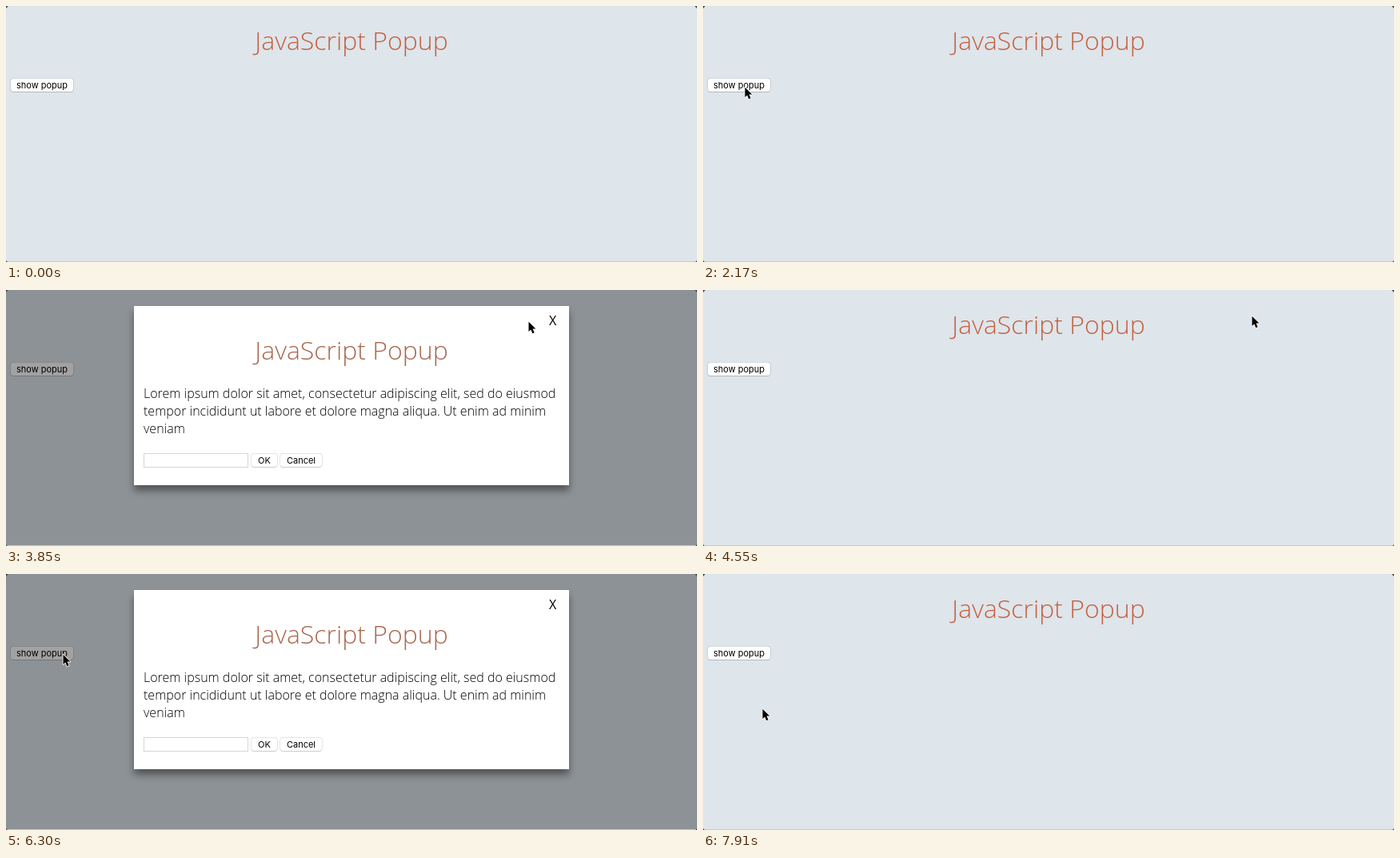
Write an HTML page that moves like this. It is 864 px wide and 320 px high and loops after 8 s.

```html
<!DOCTYPE html>
<html lang="en">
<head>
<meta charset="utf-8">
<title>JavaScript Popup</title>
<style>
  html, body { margin: 0; width: 100%; height: 100%; overflow: hidden; background: #c3c9cd; }
  svg { display: block; width: 864px; height: 320px; }

  text { font: 300 16px "Open Sans", sans-serif; }
  .title { font-size: 32px; text-anchor: middle; fill: #c4603e; }
  .popup .title { fill: #a9674f; }
  .close { font-weight: 400; text-anchor: middle; }
  .label { font: 400 11px Inter, "Liberation Sans", sans-serif; text-anchor: middle; }
  .edge { fill: #000; opacity: .2; }
  .face { fill: #fff; }

  .popup, .ring, .cursor { animation: 8s step-end infinite; }
  .popup { animation-name: popup; }
  .ring { animation-name: click; }
  .cursor { animation-name: move; }

  @keyframes popup {
    0%, 56%, 98%, 100% { visibility: hidden; }
    30.625%, 78.75% { visibility: visible; }
  }

  @keyframes click {
    0%, 12.25%, 56.875%, 98.875%, 100% { visibility: hidden; }
    11.375%, 55.125%, 97.125% { visibility: visible; }
  }

  /* each step lasts 70 ms */
  @keyframes move {
    0% { transform: translate(393px, 340px); }
    .875% { transform: translate(393px, 303px); animation-timing-function: steps(3); }
    3.5% { transform: translate(230px, 150px); animation-timing-function: steps(2); }
    5.25% { transform: translate(110px, 60px); }
    6.125% { transform: translate(75px, 46px); }
    7% { transform: translate(61px, 72px); }
    7.875% { transform: translate(58px, 98px); }
    8.75% { transform: translate(59px, 106px); }
    23.625% { transform: translate(59px, 106px); animation-timing-function: steps(4); }
    27.125% { transform: translate(52px, 101px); }
    30.625% { transform: translate(52px, 101px); animation-timing-function: steps(12); }
    41.125% { transform: translate(57px, 157px); animation-timing-function: steps(4); }
    44.625% { transform: translate(320px, 120px); animation-timing-function: steps(4); }
    48.125% { transform: translate(653px, 39px); animation-timing-function: steps(3); }
    50.75% { transform: translate(686px, 32px); }
    59.5% { transform: translate(686px, 32px); animation-timing-function: steps(6); }
    64.75% { transform: translate(270px, 70px); animation-timing-function: steps(6); }
    70% { transform: translate(72px, 102px); }
    70.875% { transform: translate(71px, 100px); }
    78.75% { transform: translate(71px, 100px); animation-timing-function: steps(11); }
    88.375% { transform: translate(531px, 78px); }
    89.25% { transform: translate(430px, 112px); }
    90.125% { transform: translate(250px, 148px); }
    91% { transform: translate(110px, 167px); }
    91.875% { transform: translate(57px, 170px); }
    92.75%, 100% { transform: translate(74px, 168px); }
  }
</style>
</head>
<body>
<svg viewBox="0 0 864 320">
  <defs>
    <filter id="shadow" x="-10%" y="-10%" width="120%" height="130%">
      <feDropShadow dx="0" dy="7" stdDeviation="5" flood-color="#000" flood-opacity=".42"/>
    </filter>
  </defs>

  <rect width="864" height="319" fill="#dee5eb"/>
  <text class="title" x="432" y="55">JavaScript Popup</text>
  <rect class="edge" x="5.5" y="90" width="79" height="18" rx="4"/>
  <rect class="face" x="6" y="90.5" width="78" height="16.5" rx="3.5"/>
  <text class="label" x="45" y="103">show popup</text>

  <g class="popup">
    <rect width="864" height="319" opacity=".365"/>
    <rect x="160" y="20" width="544" height="224" fill="#fff" filter="url(#shadow)"/>
    <text class="close" x="683.7" y="44">X</text>
    <text class="title" x="432" y="87">JavaScript Popup</text>
    <text y="135">
      <tspan x="172">Lorem ipsum dolor sit amet, consectetur adipiscing elit, sed do eiusmod</tspan>
      <tspan x="172" dy="22">tempor incididunt ut labore et dolore magna aliqua. Ut enim ad minim</tspan>
      <tspan x="172" dy="22">veniam</tspan>
    </text>
    <rect x="172.5" y="204.5" width="130" height="17" fill="#fff" stroke="#d6d6d6"/>
    <rect class="edge" x="306.5" y="204" width="33" height="18" rx="4"/>
    <rect class="face" x="307" y="204.5" width="32" height="16.5" rx="3.5"/>
    <text class="label" x="323" y="217">OK</text>
    <rect class="edge" x="342.5" y="204" width="53" height="18" rx="4"/>
    <rect class="face" x="343" y="204.5" width="52" height="16.5" rx="3.5"/>
    <text class="label" x="369" y="217">Cancel</text>
  </g>

  <path d="M0 0h3L0 3zM864 0h-3l3 3z" fill="#4a4e50"/>
  <path d="M0 320h2l-2-2zM864 320h-2l2-2z" fill="#4a4e50"/>

  <g class="cursor">
    <circle class="ring" r="22.5" fill="none" stroke="#222" stroke-width="1.5"/>
    <path d="M.5 .8V13L3.3 10.4 5.3 15.2 7.6 14.2 5.6 9.6H9.4Z" stroke="#fff" stroke-width="1.6" stroke-linejoin="round" paint-order="stroke"/>
  </g>
</svg>
</body>
</html>
```
